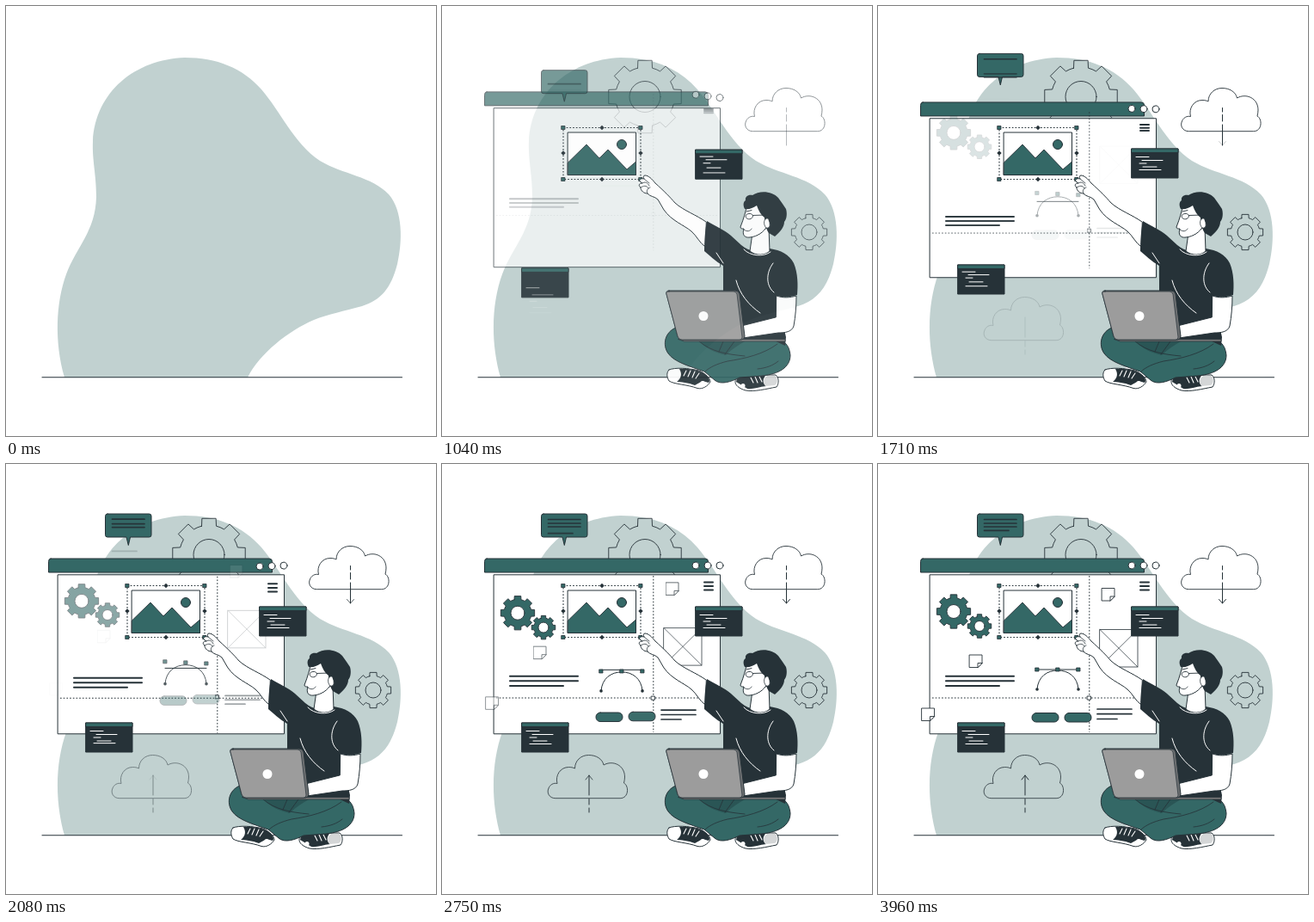
Animation of 500x500 px, one loop 4000 ms. Source, as an HTML page:

```html
<!DOCTYPE html>
<html lang="en">
<head>
<meta charset="utf-8">
<title>Interface design</title>
<style>
html, body { margin: 0; width: 100%; height: 100%; overflow: hidden; background: #fff; }
svg { display: block; width: 100vw; height: 100vh; }
</style>
</head>
<body>
<svg id="stage" viewBox="0 0 500 500" fill="none" stroke="#263238" stroke-linecap="round" stroke-linejoin="round"></svg>
<script>
const LOOP = 4000, HOLD = 250;
const DARK = '#263238', TEAL = '#346866', BLOB = '#c1d1d0';

// Wraps markup in a group that fades in while sliding from dy to its place.
const enter = (markup, start, dur = 1900, dy = 0) =>
  `<g data-start="${start}" data-dur="${dur}" data-dy="${dy}">${markup}</g>`;
const path = (d, fill = 'none', width = 1, stroke = DARK) =>
  `<path d="${d}" fill="${fill}" stroke="${stroke}" stroke-width="${width}"/>`;
const shape = (d, fill) => `<path d="${d}" fill="${fill}" stroke="none"/>`;
const rect = (x, y, w, h, fill = 'none', rx = 0, extra = '') =>
  `<rect x="${x}" y="${y}" width="${w}" height="${h}" rx="${rx}" fill="${fill}" ${extra}/>`;
const circle = (x, y, r, fill = 'none', extra = '') =>
  `<circle cx="${x}" cy="${y}" r="${r}" fill="${fill}" ${extra}/>`;
const bar = (x1, x2, y, width = 2, color = DARK) => path(`M${x1} ${y}H${x2}`, 'none', width, color);

function gear(cx, cy, R, hole, fill = 'none', holeFill = 'none') {
  const root = R * .8;
  const point = (radius, angle) =>
    `${(cx + radius * Math.sin(angle)).toFixed(2)} ${(cy - radius * Math.cos(angle)).toFixed(2)}`;
  let d = '';
  for (let i = 0; i < 8; i++) {
    const a = i * Math.PI / 4;
    d += `${i ? 'A' + root + ' ' + root + ' 0 0 1 ' : 'M'}${point(root, a - .25)}` +
      `L${point(R, a - .19)}L${point(R, a + .19)}L${point(root, a + .25)}`;
  }
  return path(d + `A${root} ${root} 0 0 1 ${point(root, -.25)}Z`, fill, .9) +
    circle(cx, cy, hole, holeFill, 'stroke-width=".9"');
}

const CLOUD = 'M361 145.7C354 145.7 351 139 353.5 134C355 130 359 127.5 363.5 128.5' +
  'C361 119 367 109.5 377 109.5C380 109.5 382 110 384 111C384 102 391 95.5 400 95.5' +
  'C409 95.5 416 100 417.5 107C428 101 442 107 442 121C442 123 441.5 126 441 128' +
  'C447 131 447 145.7 437 145.7Z';

function note(x, y) {
  return path(`M${x} ${y}h14.5v9.5l-5 5h-9.5Z`, '#fff', .9) +
    path(`M${x + 9.5} ${y + 14.5}v-5h5Z`, '#fff', .9);
}

function codeWindow(x, y, lineStart, step, lineDur) {
  const rows = [[5, 20, 9.5], [12, 36, 13.5], [9, 17, 17], [13, 29, 21], [9, 34, 24.5]];
  return rect(x, y, 54, 34, DARK) + rect(x, y, 54, 4.5, TEAL) +
    rows.map(([a, b, dy], i) =>
      enter(bar(x + a, x + b, y + dy, 1, '#fff'), lineStart + i * step, lineDur, 30)).join('');
}

function selection() {
  const handles = [[141, 141.5], [231, 141.5], [141, 201.5], [231, 201.5]]
    .map(([x, y]) => rect(x - 2, y - 2, 4, 4, TEAL, 0, 'stroke-width=".8"')).join('');
  const diamonds = [[186, 141.5], [231, 171], [186, 201.5], [141, 171]]
    .map(([x, y]) => shape(`M${x - 2.7} ${y}l2.7-2.7l2.7 2.7l-2.7 2.7Z`, DARK)).join('');
  return rect(141, 141.5, 90, 60, 'none', 0, 'stroke-dasharray="1.7 2" stroke-linecap="butt" stroke-width="1.1"') +
    rect(146.5, 147, 79, 49.5, '#fff') +
    path('M146.5 182L168 161L183 177L193 167L215 190L225.5 181V196.5H146.5Z', TEAL, .9) +
    circle(209, 161, 5.5, TEAL) + handles + diamonds;
}

function curveTool() {
  const squares = [185, 209, 233].map((x, i) =>
    enter(rect(x - 2, 237, 4, 4, TEAL, 0, 'stroke-width=".8"'), 1180 - i * 35, 1900, -30)).join('');
  const arc = path('M185 262C186 247 197 240 209 240S232 247 233 262') +
    circle(185, 262, 1.8, DARK, 'stroke="none"') + circle(233, 262, 1.8, DARK, 'stroke="none"');
  return enter(bar(185, 233, 239, 1), 885, 1900, -30) + enter(arc, 1060, 1950, -30) + squares;
}

function browser() {
  const dotted = 'stroke-dasharray="1.7 2" stroke-linecap="butt" stroke-width="1"';
  const slide = (markup, start) => enter(markup, start, 1900, -30);
  return slide(rect(60.5, 128.8, 263, 185, '#fff') +
      path('M52 110H306Q309.5 110 309.5 113.5V126H49.5V113.5Q49.5 110 52 110Z', TEAL), 150) +
    [295, 309, 323].map((x, i) => slide(circle(x, 118, 4, '#fff'), 290 - i * 50)).join('') +
    [137.5, 142, 146.5].map((y, i) => slide(bar(305, 315, y), 370 + i * 70)).join('') +
    [[158, 246.8], [158, 252.3], [141, 258]].map(([x, y], i) => slide(bar(79, x, y), 520 + i * 30)).join('') +
    slide(`<path d="M245.8 130V312" ${dotted}/>`, 730) +
    slide(`<path d="M63 272H321" ${dotted}/>`, 770) +
    slide(rect(243.5, 270, 4, 4, '#fff', 0, 'stroke-width=".9"'), 860) +
    slide(gear(88, 171.5, 20, 8, TEAL, '#fff'), 1270) +
    slide(gear(118, 188.5, 14, 6, TEAL, '#fff'), 1295) +
    curveTool() +
    [[295, 285], [295, 290.7], [278, 296.5]].map(([x, y], i) => slide(bar(255, x, y, 1.7), 1370 + i * 25)).join('') +
    slide(rect(179, 289.5, 31, 10.5, TEAL, 5), 1490) +
    slide(rect(217, 289.5, 31, 10.5, TEAL, 5), 1535) +
    slide(rect(258, 192.5, 44, 43.5, '#fff', 0, 'stroke-width=".8"') +
      path('M258 192.5L302 236M302 192.5L258 236', 'none', .7), 1570) +
    slide(note(260.5, 144.5), 1765) + slide(note(106.5, 222), 1870) + slide(note(51, 284), 1970);
}

function bubble() {
  const lines = [[161, 64.5, 415, 1680, 50], [161, 69, 830, 1900, 30], [161, 73, 830, 1900, 30], [152, 77.3, 1640, 1900, 30]];
  return enter(path('M118 58H166.5Q169 58 169 60.5V82.5Q169 85 166.5 85H144.5L142.3 94.5L140 85H118Q115.5 85 115.5 82.5V60.5Q115.5 58 118 58Z', TEAL), 350, 1500, 50) +
    lines.map(([x, y, start, dur, dy]) => enter(bar(123.5, x, y, 1.7), start, dur, dy)).join('');
}

function clouds() {
  const lower = `<g transform="translate(-229.5 243)">${path(CLOUD, 'none', .8)}</g>`;
  return enter(path(CLOUD, '#fff', .9), 500, 1300) +
    enter(path('M400.5 118.5V123M400.5 126.5V134M400.5 138V162'), 520, 1700) +
    enter(path('M396.5 157.5L400.5 162L404.5 157.5'), 1330, 1500) +
    enter(lower, 1250) +
    enter(path('M171 362V385M171 389.5V396M171 400V405'), 1400) +
    enter(path('M167 367L171 362L175 367'), 1780);
}

function legs() {
  return path('M272 374C259 379 256 394 263 404C270 414 288 419 305 425L317 435C324 441 336 437 346 432L372 430C392 428 405 420 405 406C404 394 397 386 383 387H278Z', TEAL) +
    shape('M299 389H354C345 394 337 399 330 406C317 403 306 398 299 389Z', '#2a5555') +
    path('M299 390C313 402 331 405 352 407M327 390L322 402M340 390L329 405M390 393C374 405 352 410 332 413C320 416 311 420 306 425M367 422C377 421 385 418 391 413', 'none', .8);
}

function shoes() {
  return path('M264 423C271 420 287 421 299 424C306 427 312 433 312 437C309 442 303 446 297 444.5C285 440 270 440 264 436C261 431 261 426 264 423Z', '#fff') +
    shape('M276 422C289 421 302 424 307 429C311 433 312 436 310 438L303 436L294 441C286 438 278 437 273 437C279 432 279 427 276 422Z', DARK) +
    path('M284 424L281 430M289 424L286 431M294 425L291 432M299 427L295 433', 'none', 1.1, '#fff') +
    circle(303, 438.5, 2.5, '#fff', 'stroke="none"') +
    path('M343 433C355 429 373 429 388 429C392 432 392 439 389 443C378 445 363 449 353 447C346 445 340 441 341 436Z', '#fff') +
    shape('M343 433C354 429 367 430 377 429C372 434 373 439 377 442C368 443 361 446 355 445L347 440L342 437Z', DARK) +
    shape('M378 430H388C391 434 390 439 387 441L376 442C373 437 374 433 378 430Z', '#d4d6d7') +
    path('M359 432L362 438M364 431L367 438M369 431L372 437', 'none', 1.1, '#fff') +
    circle(350, 441.5, 2.5, '#fff', 'stroke="none"');
}

function head() {
  return path('M361 264L358 285C365 291 376 290 381 285L380 258Z', '#fff') +
    path('M355 231C353 239 351 247 347 257C347 259 349 259 351 259C349 265 351 270 358 269C367 268 374 263 378 256L383 247L376 231Z', '#fff') +
    shape('M352 236C350 232 350 228 353 226C352 222 356 219 361 220C369 214 384 215 391 223L396 230L400 236C402 243 400 249 398 251C398 257 393 263 387 268L380 264C376 258 375 251 375 246C371 243 368 238 366 232C361 235 357 237 352 236Z', DARK) +
    path('M379 247C374 246 373 254 377 258C380 259 382 256 381 253', '#fff', .8) +
    path('M354 239L360 237.5M353.5 243C356 240.5 361 241 361.5 244C361 248.5 355 249 353.5 246ZM361.5 243.5L376 243', 'none', .9) +
    path('M351 260C355 263 358 262 360 259', 'none', .8);
}

function arm() {
  return path('M307 251C296 243 281 238 271 229C265 222 258 215 248 206C244 201 240 197 236 197C234 197 234 199 235 201C231 200 229 202 230 204L233 206C229 206 228 209 231 211C231 215 235 218 239 218C242 222 247 221 251 225L258 237C267 250 282 255 290 262C296 267 299 275 306 280Z', '#fff') +
    path('M235 201L241 206M233 206C236 204 239 205 241 209M231 211C234 209 238 208 240 212M239 218C237 215 239 212 242 211', 'none', .8);
}

function person() {
  return shoes() + legs() + arm() +
    shape('M308 250C318 256 328 260 336 267L348 278C353 282 358 284 362 285L381 282C394 284 404 289 409 299C414 311 414 325 413 336C405 339 396 339 389 337L400 385L399 395L384 388H336L327 348V302C318 297 311 290 305 285C305 273 306 260 308 250Z', DARK) +
    head() +
    path('M351 283C358 291 374 292 382 286', 'none', 1, '#fff') +
    path('M385 299C376 311 377 326 386 333M342 319C346 335 357 348 370 357M319 287L327 299', 'none', 1, '#fff') +
    path('M389 337C397 340 405 339 412 337C412 349 411 361 409 372C407 379 399 380 391 380L350 386L348 372L388 362Z', '#fff') +
    path('M275 387.5H399V390H282Z', '#777', .7) +
    path('M264 331H341Q345 331 346 335L352 384Q352 388 348 388H279Q275 388 274 384L261 335Q260 331 264 331Z', '#6d7072') +
    path('M264 332H339Q342 332 343 335L349 385Q349 388 346 388H279Q275 388 274 384L261 335Q260 332 264 332Z', '#9c9c9c', .7) +
    circle(304, 360.5, 5.5, '#fff', 'stroke="none"');
}

const stage = document.getElementById('stage');
stage.innerHTML =
  shape('M68 432C56 390 58 345 70 312C82 280 104 262 105 222C105 195 100 180 101 157C104 100 150 62 208 60C245 60 275 72 297 97C318 121 335 160 365 180C392 196 425 198 445 219C462 238 461 275 455 300C448 328 436 342 414 349C393 355 375 358 358 365C328 378 295 404 281 432Z', BLOB) +
  bar(42, 460.5, 431.7, 1.1) +
  '<g id="scene">' +
  enter(gear(236, 105.5, 43, 18), 370, 1300) +
  clouds() +
  enter(gear(427, 263, 21, 9), 430, 1300) +
  enter(browser(), HOLD, 1200, -30) +
  enter(selection(), HOLD, 1300) +
  bubble() +
  enter(codeWindow(295, 166, 230, 65, 900), HOLD, 820, -50) +
  enter(codeWindow(93, 301, 510, 82, 1300), 410, 1100, 30) +
  enter(person(), HOLD, 1300) +
  '</g>';

// Cubic bezier (.36, -.01, .5, 1.38): runs a little past its end.
function ease(x) {
  if (x <= 0) return 0;
  if (x >= 1) return 1;
  const bezier = (a, b, s) => 3 * (1 - s) ** 2 * s * a + 3 * (1 - s) * s * s * b + s ** 3;
  let lo = 0, hi = 1;
  for (let i = 0; i < 16; i++) {
    const mid = (lo + hi) / 2;
    if (bezier(.36, .5, mid) < x) lo = mid; else hi = mid;
  }
  return bezier(-.01, 1.38, lo);
}

const scene = document.getElementById('scene');
const parts = [...scene.querySelectorAll('[data-start]')].map(node => ({
  node, start: +node.dataset.start, dur: +node.dataset.dur, dy: +node.dataset.dy
}));

function render(t) {
  scene.setAttribute('visibility', t < HOLD ? 'hidden' : 'visible');
  for (const { node, start, dur, dy } of parts) {
    const p = ease((t - start) / dur);
    node.setAttribute('opacity', Math.max(0, Math.min(1, p)).toFixed(3));
    if (dy) node.setAttribute('transform', `translate(0 ${(dy * (1 - p)).toFixed(2)})`);
  }
}

const began = performance.now();
function tick() {
  render((performance.now() - began) % LOOP);
  requestAnimationFrame(tick);
}
tick();
</script>
</body>
</html>
```
